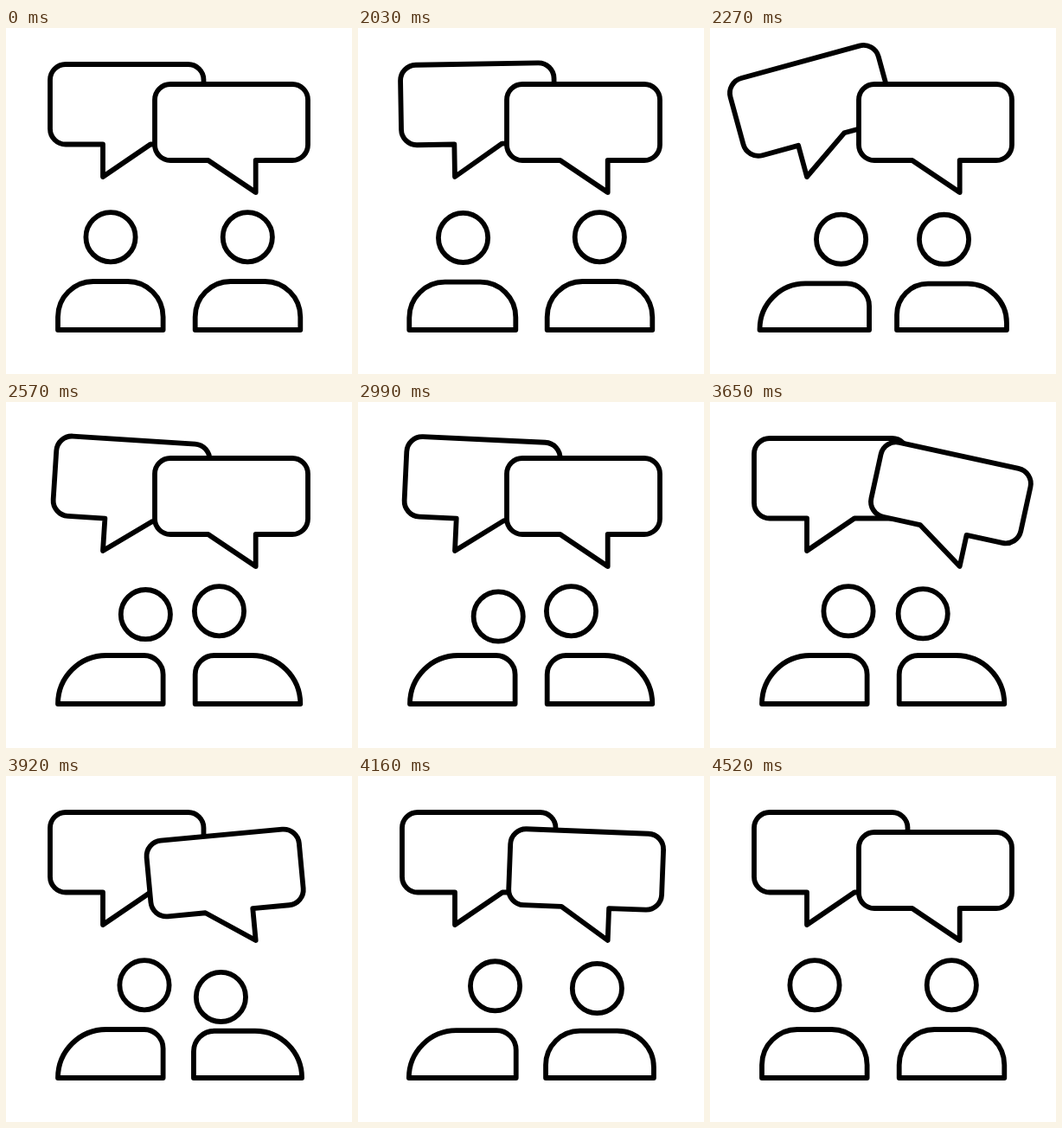
An HTML page with a canvas for the animation above (4550 ms loop, 400x400 px).

```html
<!DOCTYPE html>
<html lang="en">
<head>
<meta charset="utf-8">
<title>Conversation</title>
<style>
  html, body { margin: 0; width: 100%; height: 100%; overflow: hidden; background: #fff; }
  canvas { display: block; width: 400px; height: 400px; }
</style>
</head>
<body>
<canvas id="stage" width="400" height="400"></canvas>
<script>
const ctx = document.getElementById('stage').getContext('2d');

const LOOP = 4550, HOLD = 2030, STEP = 30;

// Times below are counted in steps after the opening hold.
const SWING = [[0, 0], [7, -20], [15.3, 14.4], [23, -8.5], [31, 3.2], [38.5, 0]];
const TURN_TIME = 13, NOD_TIME = 13, NOD_COUNT = 3;

const people = [
  { x: 120.8, dir: 1, headX: 121, turnedX: 160, turnIn: 0, turnOut: 70.4,
    nodStart: 16.2, nodDepth: 10, nodLean: 0.35 },
  { x: 279.5, dir: -1, headX: 279.3, turnedX: 246.5, turnIn: 4.5, turnOut: 61.4,
    nodStart: 44.2, nodDepth: 12, nodLean: 0.1 }
];

const bubbles = [
  { left: 51, top: 42, right: 228.5, bottom: 134.5, tipX: 112, tipY: 172, dir: 1, start: 0 },
  { left: 172, top: 65, right: 349, bottom: 153, tipX: 288.7, tipY: 190, dir: -1, start: 38.2 }
];

const clamp = u => Math.min(1, Math.max(0, u));
const ease = u => (1 - Math.cos(Math.PI * clamp(u))) / 2;
const mix = (a, b, u) => a + (b - a) * u;

function swingAngle(n) {
  for (let i = 1; i < SWING.length; i++) {
    const [t0, a0] = SWING[i - 1], [t1, a1] = SWING[i];
    if (n <= t1) return mix(a0, a1, ease((n - t0) / (t1 - t0)));
  }
  return 0;
}

function drawBubble(b, n) {
  const r = 18, tailX = b.tipX + 55 * b.dir;
  const tail = [[tailX, b.bottom], [b.tipX, b.tipY], [b.tipX, b.bottom]];
  if (b.dir < 0) tail.reverse();
  ctx.save();
  ctx.translate(b.tipX, b.tipY);
  ctx.rotate(swingAngle(n - b.start) * Math.PI / 180);
  ctx.translate(-b.tipX, -b.tipY);
  ctx.beginPath();
  ctx.moveTo(b.left + r, b.top);
  ctx.arcTo(b.right, b.top, b.right, b.bottom, r);
  ctx.arcTo(b.right, b.bottom, b.left, b.bottom, r);
  tail.forEach(p => ctx.lineTo(...p));
  ctx.arcTo(b.left, b.bottom, b.left, b.top, r);
  ctx.arcTo(b.left, b.top, b.right, b.top, r);
  ctx.closePath();
  ctx.fill();
  ctx.stroke();
  ctx.restore();
}

function drawPerson(p, n) {
  const inU = clamp((n - p.turnIn) / TURN_TIME);
  const outU = clamp((n - p.turnOut) / TURN_TIME);
  const turn = ease(inU) - ease(outU);
  const squash = 3 * (Math.sin(Math.PI * inU) + Math.sin(Math.PI * outU));
  const nodU = Math.min(NOD_COUNT, Math.max(0, (n - p.nodStart) / NOD_TIME));
  const nod = p.nodDepth * (1 - Math.cos(2 * Math.PI * nodU)) / 2;

  ctx.beginPath();
  ctx.arc(mix(p.headX, p.turnedX, turn) + p.dir * p.nodLean * nod,
          241.7 + nod + squash, 28.6, 0, 2 * Math.PI);
  ctx.stroke();

  // Shoulders: the back one opens out while the front one tightens.
  const half = 60.8 + squash, top = 293 + squash, base = 349;
  const back = Math.min(mix(41, 56, turn), base - top), front = mix(41, 22, turn);
  ctx.save();
  ctx.translate(p.x, 0);
  ctx.scale(p.dir, 1);
  ctx.beginPath();
  ctx.moveTo(-half, base);
  ctx.arcTo(-half, top, half, top, back);
  ctx.arcTo(half, top, half, base, front);
  ctx.lineTo(half, base);
  ctx.closePath();
  ctx.stroke();
  ctx.restore();
}

function draw(now) {
  const t = now % LOOP;
  const n = t < HOLD ? 0 : Math.floor((t - HOLD) / STEP) + 1;
  ctx.fillStyle = '#fff';
  ctx.fillRect(0, 0, 400, 400);
  ctx.strokeStyle = '#000';
  ctx.lineWidth = 5.8;
  ctx.lineJoin = 'round';
  bubbles.forEach(b => drawBubble(b, n));
  people.forEach(p => drawPerson(p, n));
}

const begin = performance.now();
function tick() {
  draw(performance.now() - begin);
  requestAnimationFrame(tick);
}
tick();
</script>
</body>
</html>
```
